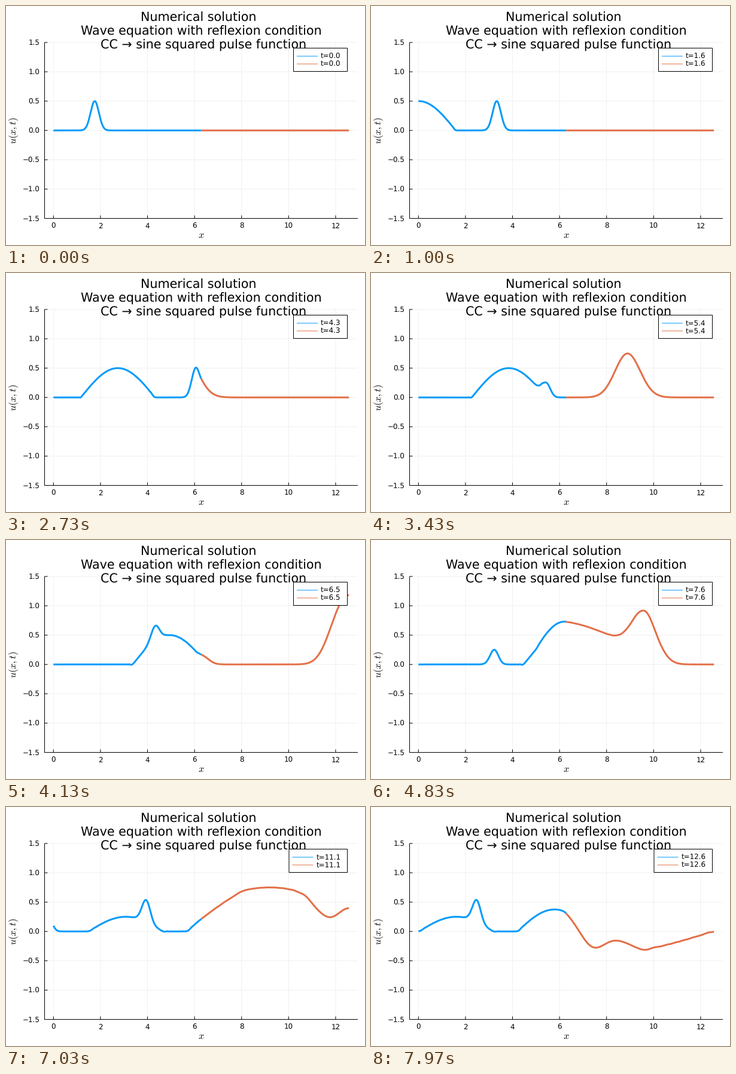
Write a matplotlib script that moves like this. It is 600 px wide and 400 px high and loops after 8 s.

```python
import numpy as np
import matplotlib.pyplot as plt
from matplotlib.animation import FuncAnimation
from matplotlib.patches import Rectangle

W, H, DPI = 600, 400, 100
TICKS, TICK_MS = 800, 10           # fine clock; the picture runs at 30 fps
SHOTS = 240
BLUE, ORANGE = "#009AFA", "#E36F47"
PX = 72 / DPI                      # points per pixel
TITLE, LABEL, SMALL = 20.7, 16.3, 11.86

plt.rcParams["font.family"] = "DejaVu Sans"
plt.rcParams["mathtext.fontset"] = "cm"
plt.rcParams["text.hinting"] = "none"

# Wave equation u_tt = c^2 u_xx over two media, c = 1 and c = 3
SPLIT, STEPS = 399, 10
N = 2 * SPLIT + 1
L = 4 * np.pi
x = np.linspace(0, L, N)
dx = x[1] - x[0]
dt = dx / 3
c = np.where(np.arange(N) <= SPLIT, 1.0, 3.0)


def pulse(s):
    return 0.5 * np.exp(-((s - 1.75) / 0.25) ** 2)


def solve():
    """Leapfrog scheme: driven then open left end, free right end."""
    r2 = (c * dt / dx) ** 2
    mur = (dt - dx) / (dt + dx)
    prev, u = pulse(x + dt), pulse(x)
    shots = []
    for k in range(1, STEPS * (SHOTS - 1) + 2):
        t = k * dt
        new = np.empty(N)
        new[1:-1] = (2 * u[1:-1] - prev[1:-1]
                     + r2[1:-1] * (u[2:] - 2 * u[1:-1] + u[:-2]))
        new[-1] = 2 * u[-1] - prev[-1] + 2 * r2[-1] * (u[-2] - u[-1])
        if t <= 2 * np.pi:
            new[0] = 0.5 * np.sin(min(t, np.pi))
        else:
            new[0] = u[1] + mur * (new[1] - u[0])
        prev, u = u, new
        if k % STEPS == 1:
            shots.append((t, u))
    return shots


shots = solve()

fig = plt.figure(figsize=(W / DPI, H / DPI), dpi=DPI, facecolor="white")

# Plot area in pixels, y measured downwards
X0, X1, Y0, Y1 = 64.5, 588, 61, 355.5


def pixel_axes(z):
    axes = fig.add_axes([0, 0, 1, 1], zorder=z)
    axes.set_xlim(0, W)
    axes.set_ylim(H, 0)
    axes.axis("off")
    return axes


under, over = pixel_axes(-1), pixel_axes(1)
ax = fig.add_axes([X0 / W, 1 - Y1 / H, (X1 - X0) / W, (Y1 - Y0) / H])
ax.set_xlim(-0.03 * L, 1.03 * L)
ax.set_ylim(-1.5, 1.5)
ax.axis("off")


def stroke(axes, xs, ys, color="black", width=1.0, **kw):
    return axes.plot(xs, ys, color=color, lw=width * PX, snap=False,
                     solid_capstyle="butt", **kw)[0]


def strokes(parts, color, width):
    """Draw many (xa, ya, xb, yb) pieces as one broken line."""
    gap = np.nan
    stroke(under, [v for p in parts for v in (p[0], p[2], gap)],
           [v for p in parts for v in (p[1], p[3], gap)], color, width)


def label(px, py, text, size, ha="center", va="baseline", **kw):
    return over.text(px, py, text, fontsize=size * PX, ha=ha, va=va, **kw)


def to_px(v):
    return X0 + (v + 0.03 * L) / (1.06 * L) * (X1 - X0)


def to_py(v):
    return Y1 - (v + 1.5) / 3 * (Y1 - Y0)


grid, frame = [], [(X0, Y0, X0, Y1 + 0.5), (X0 - 0.5, Y1, X1, Y1)]
for v in range(0, 13, 2):
    p = to_px(v)
    grid.append((p, Y0, p, Y1))
    frame.append((p, Y1, p, Y1 - 5))
    label(p, 371.6, str(v), SMALL)
for v in np.arange(-1.5, 1.6, 0.5):
    p = to_py(v)
    grid.append((X0, p, X1, p))
    frame.append((X0, p, X0 + 5, p))
    label(56.5, p + 4.3, f"{v:.1f}".replace("-", "\u2212"), SMALL, "right")
strokes(grid, "#EDEDED", 0.8)
strokes(frame, "black", 1)

label(322, 26, "Numerical solution", TITLE)
label(326, 48.7, "Wave equation with reflexion condition", TITLE)
label(330.2, 71.3, "CC \u2192 sine squared pulse function", TITLE)
label(326, 388, "$x$", LABEL)
label(13, 209, "$u(x,t)$", LABEL, rotation=90, va="center")

curves = [stroke(ax, [], [], col, 3, solid_joinstyle="round")
          for col in (BLUE, ORANGE)]
parts = [slice(0, SPLIT + 1), slice(SPLIT, N)]

# Legend, widened to the left by one digit for t >= 10
box = over.add_patch(Rectangle((480.5, 70.5), 90, 39, fc="white", ec="black",
                               lw=PX, snap=False, zorder=4))
rows = [(stroke(over, [0, 0], [y, y], col, 1, zorder=5),
         label(0, y + 4.3, "", SMALL, "left", zorder=5))
        for y, col in ((84, BLUE), (97, ORANGE))]


def draw(tick):
    t, u = shots[(3 * tick + 1) // 10]
    text = f"t={t:.1f}"
    shift = 7.5 * (len(text) - 5)
    box.set_x(480.5 - shift)
    box.set_width(90 + shift)
    for line, name in rows:
        line.set_xdata([486 - shift, 521 - shift])
        name.set_x(526 - shift)
        name.set_text(text)
    for curve, part in zip(curves, parts):
        curve.set_data(x[part], u[part])
    return curves


anim = FuncAnimation(fig, draw, frames=TICKS, interval=TICK_MS,
                     init_func=lambda: draw(0), repeat=True, repeat_delay=0)
plt.show()
```
